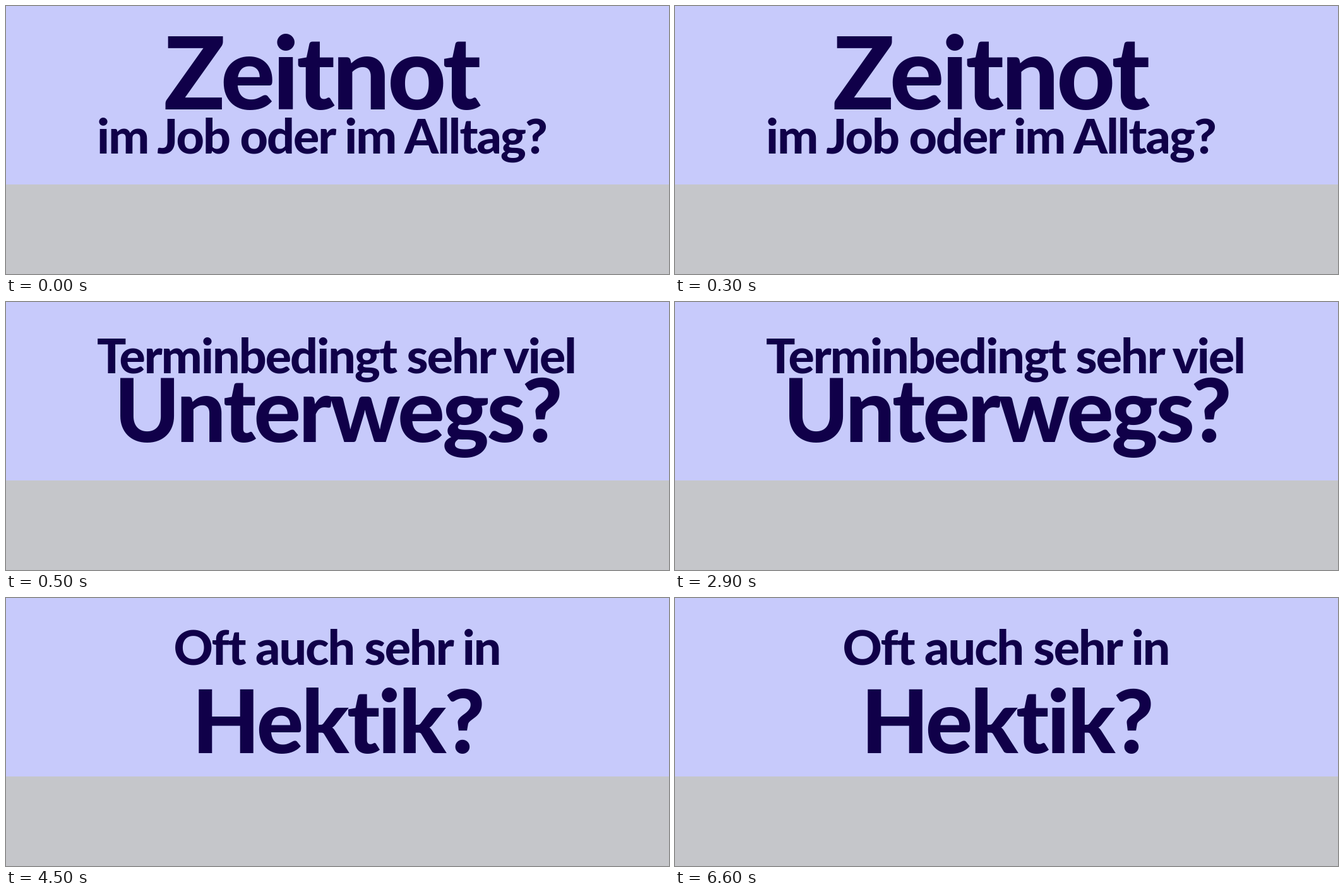
Animation, 1050 px wide and 425 px high, one loop 8 s. Source, as an HTML page:

```html
<!DOCTYPE html>
<html lang="de">
<head>
<meta charset="utf-8">
<title>Zeitnot</title>
<style>
  html, body { margin: 0; width: 100%; height: 100%; overflow: hidden; background: #c5c6ca; }
  svg { display: block; width: 1050px; height: 425px; }
  text { font-family: Lato, sans-serif; font-weight: 800; letter-spacing: -0.025em; text-anchor: middle; fill: #100049; }
</style>
</head>
<body>
<svg id="stage" viewBox="0 0 1050 425">
  <rect width="1050" height="425" fill="#c5c6ca"/>
  <rect width="1050" height="283" fill="#c7cafb"/>
</svg>
<script>
const LOOP = 8000;
const NS = "http://www.w3.org/2000/svg";
const stage = document.getElementById("stage");

// lines: [text, centre x, baseline, font size]
const slides = [
  { from: 0, to: 500, lines: [["Zeitnot", 499, 164, 161], ["im Job oder im Alltag?", 500, 234, 77]] },
  { from: 500, to: 4500, lines: [["Terminbedingt sehr viel", 523, 113, 77], ["Unterwegs?", 525, 222, 139]] },
  { from: 4500, to: 8000, lines: [["Oft auch sehr in", 524, 106, 77], ["Hektik?", 525, 246, 139]] }
];

function add(parent, tag, attrs = {}) {
  const el = document.createElementNS(NS, tag);
  for (const key in attrs) el.setAttribute(key, attrs[key]);
  return parent.appendChild(el);
}

for (const slide of slides) {
  slide.group = add(stage, "g");
  for (const [words, x, y, size] of slide.lines)
    add(slide.group, "text", { x, y, "font-size": size }).textContent = words;
}

function draw() {
  const t = performance.now() % LOOP;
  for (const { from, to, group } of slides)
    group.setAttribute("visibility", t >= from && t < to ? "visible" : "hidden");
  requestAnimationFrame(draw);
}
draw();
</script>
</body>
</html>
```
